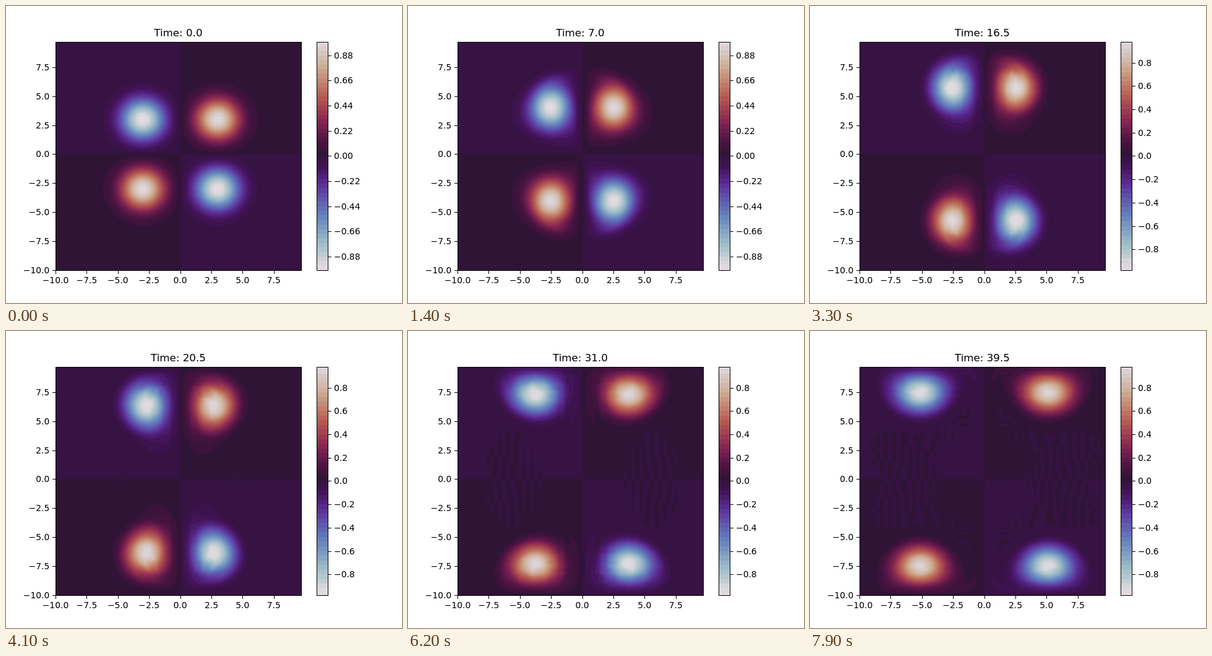
Animation of 640 by 480 pixels, one loop 8000 ms. Source, as an HTML page with a canvas:

```html
<!DOCTYPE html>
<html>
<head>
<meta charset="utf-8">
<style>
html, body { margin: 0; height: 100%; overflow: hidden; background: #fff; }
canvas { display: block; }
</style>
</head>
<body>
<canvas id="stage" width="640" height="480"></canvas>
<script>
const ctx = document.getElementById('stage').getContext('2d');

// Vorticity equation on one quarter of the periodic box; the rest follows by odd symmetry.
const N = 32, W = N + 1, SIZE = W * W, H = 10 / N;
const NU = 0.001, SPREAD = 3.125, DT = 0.25, FRAMES = 80;

const sine = new Float64Array(SIZE);
for (let i = 0; i < W; i++)
  for (let j = 0; j < W; j++) sine[i * W + j] = Math.sin(Math.PI * i * j / N);

function multiply(a, b) {
  const out = new Float64Array(SIZE);
  for (let i = 1; i < N; i++)
    for (let k = 1; k < N; k++) {
      const f = a[i * W + k];
      for (let j = 1; j < N; j++) out[i * W + j] += f * b[k * W + j];
    }
  return out;
}
const transform = f => multiply(multiply(sine, f), sine);

function streamFunction(w) {
  const s = transform(w);
  for (let i = 1; i < N; i++)
    for (let j = 1; j < N; j++)
      s[i * W + j] *= -(4 / (N * N)) / ((i * i + j * j) * (Math.PI / 10) ** 2);
  return transform(s);
}

function rate(w) {
  const p = streamFunction(w), out = new Float64Array(SIZE);
  for (let i = 1; i < N; i++)
    for (let j = 1; j < N; j++) {
      const c = i * W + j, n = c + W, s = c - W, e = c + 1, o = c - 1;
      const bracket = (p[e] - p[o]) * (w[n] - w[s]) - (p[n] - p[s]) * (w[e] - w[o]);
      const laplace = w[n] + w[s] + w[e] + w[o] - 4 * w[c];
      out[c] = (bracket / 4 + NU * laplace) / (H * H);
    }
  return out;
}

function step(w) {
  const add = (k, f) => w.map((v, i) => v + f * k[i]);
  const a = rate(w), b = rate(add(a, DT / 2)), c = rate(add(b, DT / 2)), d = rate(add(c, DT));
  return w.map((v, i) => v + DT / 6 * (a[i] + 2 * b[i] + 2 * c[i] + d[i]));
}

const bump = i => Math.exp(-((i * H - 3) ** 2) / SPREAD) - Math.exp(-((i * H + 3) ** 2) / SPREAD);
let field = new Float64Array(SIZE);
for (let i = 1; i < N; i++)
  for (let j = 1; j < N; j++) field[i * W + j] = bump(i) * bump(j);
const fields = [field];
while (fields.length < FRAMES) fields.push(field = step(step(field)));

// Colour map: position and colour
const stops = [
  [0, 'e2d9e2'], [.03, 'd5d6da'], [.06, 'bccacf'], [.111, '9ebbc9'], [.125, '95b5c7'],
  [.222, '6785be'], [.25, '6276ba'], [.333, '5e43a5'], [.375, '592a8f'], [.444, '421257'],
  [.5, '2f1436'], [.556, '471340'], [.625, '741e4f'], [.667, '8e2c50'], [.75, 'b25652'],
  [.778, 'ba6657'], [.875, 'cca389'], [.889, 'ceac94'], [.97, 'd8cecd'], [1, 'e2d9e2']
].map(([at, hex]) => [at, [0, 2, 4].map(i => parseInt(hex.substr(i, 2), 16))]);

function colour(at) {
  let i = 1;
  while (i < stops.length - 1 && stops[i][0] < at) i++;
  const [a, from] = stops[i - 1], [b, to] = stops[i], f = (at - a) / (b - a);
  const [r, g, bl] = from.map((v, k) => Math.round(v + (to[k] - v) * f));
  return 255 << 24 | bl << 16 | g << 8 | r;
}

const band = v => v >= 0 ? Math.floor(v / .04) : -Math.floor((.02 - v) / .04 + .5);
const MID = 40;
function makePalette(max) {
  return Int32Array.from({ length: 2 * MID + 1 }, (_, i) => {
    const k = i - MID;
    const v = k > 0 ? (k + .5) * .04 : k < 0 ? k * .04 : 0;
    return colour(.5 + Math.max(-1, Math.min(1, v / max)) / 2);
  });
}

// Plot geometry
const LEFT = 80, TOP = 57.6, PW = 396.8, PH = 369.6, BOTTOM = TOP + PH, SPAN = 20 - H;
const px = x => LEFT + (x + 10) / SPAN * PW;
const py = y => BOTTOM - (y + 10) / SPAN * PH;
const snap = v => Math.floor(v + .5);

function samples(count, toValue) {
  return Array.from({ length: count }, (_, i) => {
    const v = toValue(i + .5), a = Math.min(Math.abs(v) / H, N - 1e-6);
    return { cell: Math.floor(a), part: a % 1, sign: Math.sign(v) };
  });
}
const columns = samples(397, i => -10 + i / PW * SPAN);
const rows = samples(370, i => -10 + (BOTTOM - 58 - i) / PH * SPAN);
const image = ctx.createImageData(397, 370);
const pixels = new Int32Array(image.data.buffer);

function drawField(w, palette) {
  let n = 0;
  for (const r of rows)
    for (const c of columns) {
      const k = r.cell * W + c.cell;
      const low = w[k] + (w[k + 1] - w[k]) * c.part;
      const high = w[k + W] + (w[k + W + 1] - w[k + W]) * c.part;
      const v = (low + (high - low) * r.part) * r.sign * c.sign;
      pixels[n++] = palette[MID + band(v)];
    }
  ctx.putImageData(image, 80, 58);
}

const css = c => `rgb(${c & 255},${c >> 8 & 255},${c >> 16 & 255})`;
const label = (v, digits) => v.toFixed(digits).replace('-', '\u2212');

function text(str, x, y, align, size = 13.89) {
  ctx.font = `${size}px "DejaVu Sans", sans-serif`;
  ctx.textAlign = align;
  ctx.fillText(str, x, y);
}

function drawAxes() {
  ctx.strokeRect(80.5, 58.5, 397, 369);
  for (let v = -10; v < 9; v += 2.5) {
    const x = snap(px(v)), y = snap(py(v));
    ctx.fillRect(x, 428, 1, 5);
    ctx.fillRect(75, y, 5, 1);
    text(label(v, 1), px(v), 448, 'center');
    text(label(v, 1), 70.3, Math.round(py(v) + 5), 'right');
  }
}

function drawBar(max, palette) {
  const mid = TOP + PH / 2, scale = PH / 2 / max;
  for (let y = 58; y < 428; y++) {
    ctx.fillStyle = css(palette[MID + band((mid - y - .5) / scale)]);
    ctx.fillRect(502, y, 18, 1);
  }
  ctx.fillStyle = '#000';
  ctx.strokeRect(502.5, 58.5, 18, 369);
  const [gap, digits] = max === 1 ? [.22, 2] : [.2, 1];
  for (let k = -4; k <= 4; k++) {
    const y = mid - k * gap * scale;
    ctx.fillRect(521, snap(y), 5, 1);
    text(label(k * gap, digits), 530, Math.round(y + 5), 'left');
  }
}

const rangeAt = ms => ms < 3200 ? 1 : ms >= 6800 && ms < 7500 ? .96 : .98;
const palettes = { 1: makePalette(1), .98: makePalette(.98), .96: makePalette(.96) };

function draw(frame) {
  const max = rangeAt(frame * 100), palette = palettes[max];
  ctx.fillStyle = '#fff';
  ctx.fillRect(0, 0, 640, 480);
  drawField(fields[frame], palette);
  drawBar(max, palette);
  drawAxes();
  text('Time: ' + (frame / 2).toFixed(1), 278.4, 49, 'center', 16.67);
}

let shown = -1;
const start = performance.now();
function tick() {
  const frame = Math.floor((performance.now() - start) / 100) % FRAMES;
  if (frame !== shown) draw(shown = frame);
  requestAnimationFrame(tick);
}
tick();
</script>
</body>
</html>
```
